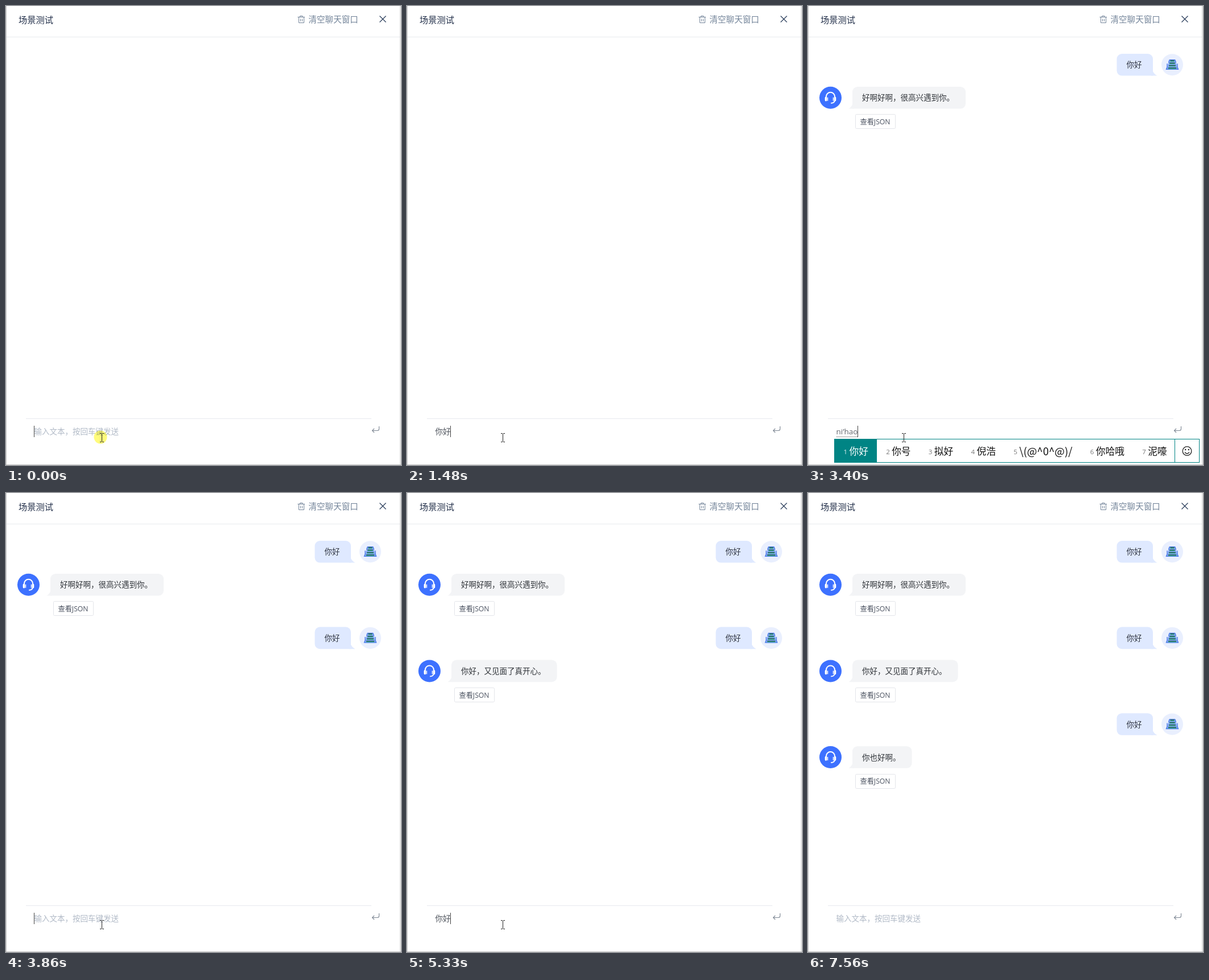
Write an HTML page with a canvas that moves like this. It is 694 by 807 pixels and loops after 7.65 s.

```html
<!DOCTYPE html>
<html lang="zh-CN">
<head>
<meta charset="utf-8">
<title>场景测试</title>
<style>
html, body { margin: 0; width: 100%; height: 100%; overflow: hidden; background: #fff; }
canvas { display: block; width: 694px; height: 807px; }
</style>
</head>
<body>
<canvas id="stage" width="694" height="807"></canvas>
<script>
const ctx = document.getElementById('stage').getContext('2d');
const LOOP = 7650;
const ROW = 151.6;
const TEAL = '#008484';
const FONT = '"Open Sans", "Noto Sans CJK SC", "Noto Sans CJK", sans-serif';
const CJK = '"Noto Sans CJK SC", "Noto Sans CJK", sans-serif';
const PLACEHOLDER = '输入文本，按回车键发送';

// [time, input text, composing]
const typing = [
  [0, ''],
  [610, 'n', 1], [840, 'ni', 1], [990, 'ni’h', 1], [1080, 'ni’ha', 1], [1160, 'ni’hao', 1],
  [1480, '你好'], [2090, ''],
  [2860, 'n', 1], [3090, 'ni', 1], [3240, 'ni’h', 1], [3320, 'ni’ha', 1], [3400, 'ni’hao', 1],
  [3550, '你好'], [3860, ''],
  [4470, 'n', 1], [4780, 'ni', 1], [4940, 'ni’h', 1], [5010, 'ni’ha', 1], [5180, 'ni’hao', 1],
  [5330, '你好'], [6100, '']
];

const caretOff = [[450, 610], [2010, 2090], [2630, 2860], [4400, 4470],
  [5870, 6100], [6650, 7030], [7560, LOOP]];

const rounds = [
  { sent: 2090, replied: 2170, reply: '好啊好啊，很高兴遇到你。' },
  { sent: 3860, replied: 3940, reply: '你好，又见面了真开心。' },
  { sent: 6100, replied: 6170, reply: '你也好啊。' }
];

const candidates = {
  'n': '你 呢 那 年 您 能 内',
  'ni': '你 呢 尼 泥 拟 逆 妮',
  'ni’h': '你好 你会 你还 你和 你很 你或 你后',
  'ni’ha': '你还 你好 你哈 你汗 你海 你喊 拟好',
  'ni’hao': '你好 你号 拟好 倪浩 \\(@^0^@)/ 你哈哦 泥嚎'
};

function text(s, x, cy, size, color, weight = 400, family = FONT) {
  ctx.font = `${weight} ${size}px ${family}`;
  ctx.fillStyle = color;
  ctx.fillText(s, x, cy + size * 0.38);
  return ctx.measureText(s).width;
}

function rect(x, y, w, h, color) {
  ctx.fillStyle = color;
  ctx.fillRect(x, y, w, h);
}

function circle(x, y, r, color) {
  ctx.fillStyle = color;
  ctx.beginPath();
  ctx.arc(x, y, r, 0, Math.PI * 2);
  ctx.fill();
}

function stroke(path, color, width = 1) {
  ctx.strokeStyle = color;
  ctx.lineWidth = width;
  ctx.stroke(new Path2D(path));
}

function fill(path, color) {
  ctx.fillStyle = color;
  ctx.fill(new Path2D(path));
}

function roundBox(x, y, w, h, radii, color) {
  ctx.fillStyle = color;
  ctx.beginPath();
  ctx.roundRect(x, y, w, h, radii);
  ctx.fill();
}

function drawWindow() {
  rect(0, 0, 694, 807, '#fff');
  rect(0, 0, 1, 807, '#c9c9c9');
  rect(692, 0, 1, 807, '#d0d0d0');
  rect(693, 0, 1, 807, '#ececec');
  rect(0, 806, 694, 1, '#c4c4c4');
  rect(1, 54, 691, 1, '#e9eaee');
  rect(35, 725, 607, 1, '#e8eaee');

  text('场景测试', 22, 24, 15.25, '#23304a', 500);
  text('清空聊天窗口', 531.5, 23.5, 14.55, '#74859a');
  stroke('M512.5 19.5H525M516.5 19V17.5H521V19M514.5 20V29.5H523.5V20M517.5 22.5V27M520.5 22.5V27', '#74859a');
  stroke('M656.5 17.5L667.5 28.5M667.5 17.5L656.5 28.5', '#2c3f5c', 1.3);
  stroke('M655.5 739V743.5Q655.5 746.5 652.5 746.5H643.5M647 743L643.5 746.5L647 750', '#7d8793', 1.1);
}

function drawUser(cy) {
  roundBox(542.5, cy - 19.3, 63.5, 38.6, [9, 9, 0, 9], '#dfe9ff');
  fill(`M605 ${cy + 9}Q607 ${cy + 16} 613.5 ${cy + 19.3}H603Z`, '#dfe9ff');
  text('你好', 559.5, cy, 13.5, '#2f3440');

  circle(640, cy, 19, '#e9effe');
  ctx.save();
  ctx.translate(640, cy);
  fill('M-5 -8.5H5L10.5 8.5H-10.5Z', '#86a9f5');
  stroke('M-5 -8.5H5M-5 -8.5L-6.5 -3.5M5 -8.5L6.5 -3.5M-9 -2V4L-10.5 8H10.5L9 4V-2', '#4d7de8', 1.4);
  for (let i = 0; i < 4; i++) {
    const half = 3.5 + i * 1.2;
    const y = -8 + i * 4.3;
    rect(-half, y, half * 2, 2.6, '#3aa98c');
    rect(-half, y, half * 2, 1.2, '#214c55');
  }
  ctx.restore();
}

function drawReply(message, cy) {
  const width = message.length * 13.5 + 37;
  roundBox(78, cy - 19.3, width, 38.6, [9, 9, 9, 0], '#f3f4f6');
  fill(`M79 ${cy + 9}Q77 ${cy + 16} 71.5 ${cy + 19.3}H81Z`, '#f3f4f6');
  text(message, 95, cy, 13.5, '#2f3338');

  circle(39.5, cy, 19.5, '#3d71ff');
  ctx.save();
  ctx.translate(39.5, cy);
  ctx.lineCap = 'round';
  stroke('M-7.5 0V-2A7.5 7.5 0 0 1 7.5 -2V0', '#fff', 2);
  stroke('M-8 0V4.5M8 0V4.5', '#fff', 3.6);
  stroke('M7.5 5Q6.5 9.3 1.5 9.5', '#fff', 1.9);
  stroke('M-5 0V5M5 0V5', '#fff', 1.4);
  ctx.restore();

  ctx.strokeStyle = '#e3e5ea';
  ctx.lineWidth = 1;
  ctx.beginPath();
  ctx.roundRect(83.5, Math.round(cy + 29) + 0.5, 70, 25, 2);
  ctx.stroke();
  text('查看JSON', 91.5, cy + 42, 12.2, '#4b5260');
}

function drawCandidates(key) {
  let x = 46;
  const cells = candidates[key].split(' ').map((word, i) => {
    const face = word[0] === '\\';
    const size = face ? 18.6 : 16.7;
    ctx.font = `${size}px ${CJK}`;
    const cell = { word, size, x, index: i + 1, w: ctx.measureText(word).width + 41.3 };
    x += cell.w;
    return cell;
  });
  const split = Math.round(x);
  rect(46, 761, split - 46 + 43, 42, TEAL);
  rect(47, 762, split - 46 + 41, 40, '#fff');
  rect(46, 761, Math.round(cells[0].w), 42, TEAL);
  rect(split - 1, 761, 1, 42, TEAL);
  for (const c of cells) {
    const first = c.index === 1;
    text(c.index, c.x + 16.5, 784, 11.5, first ? '#e2f3f3' : '#777');
    text(c.word, c.x + 26.5, 782.5, c.size, first ? '#fff' : '#111', 400, CJK);
  }
  const sx = split + 21;
  ctx.strokeStyle = '#222';
  ctx.lineWidth = 1.3;
  ctx.beginPath();
  ctx.arc(sx, 782.5, 7.8, 0, Math.PI * 2);
  ctx.stroke();
  stroke(`M${sx - 4} 784.5Q${sx} 789.5 ${sx + 4} 784.5`, '#222', 1.3);
  circle(sx - 2.8, 780, 1.2, '#222');
  circle(sx + 2.8, 780, 1.2, '#222');
}

function drawInput(t) {
  const [, value, composing] = typing.filter(step => step[0] <= t).pop();
  let caret = 49;
  if (value) {
    const w = text(value, 49.5, 748, 13.5, composing ? '#62666d' : '#4f545d');
    caret = Math.round(49 + w);
    if (composing) {
      for (let x = 50; x < caret; x += 2) rect(x, 757, 1, 1, '#444');
      drawCandidates(value);
    }
  } else {
    text(PLACEHOLDER, 49.5, 748, 13.5, '#b1bac7');
  }
  if (!caretOff.some(([from, to]) => t >= from && t < to)) rect(caret, 738, 1, 20, '#444');
}

function drawPointer(t) {
  if (t < 80) {
    ctx.globalCompositeOperation = 'multiply';
    circle(166, 758, 11.5, '#fffb7c');
    ctx.globalCompositeOperation = 'source-over';
  }
  if (t < 7100) {
    stroke('M165 751.5H167.5L168.5 752.5L169.5 751.5H172M168.5 752V766M165 766.5H167.5L168.5 765.5L169.5 766.5H172', '#222');
  }
}

function draw(t) {
  drawWindow();
  rounds.forEach((r, i) => {
    if (t >= r.sent) drawUser(103.3 + i * ROW);
    if (t >= r.replied) drawReply(r.reply, 161.3 + i * ROW);
  });
  drawInput(t);
  drawPointer(t);
}

const start = performance.now();
function tick() {
  draw((performance.now() - start) % LOOP);
  requestAnimationFrame(tick);
}
tick();
</script>
</body>
</html>
```
